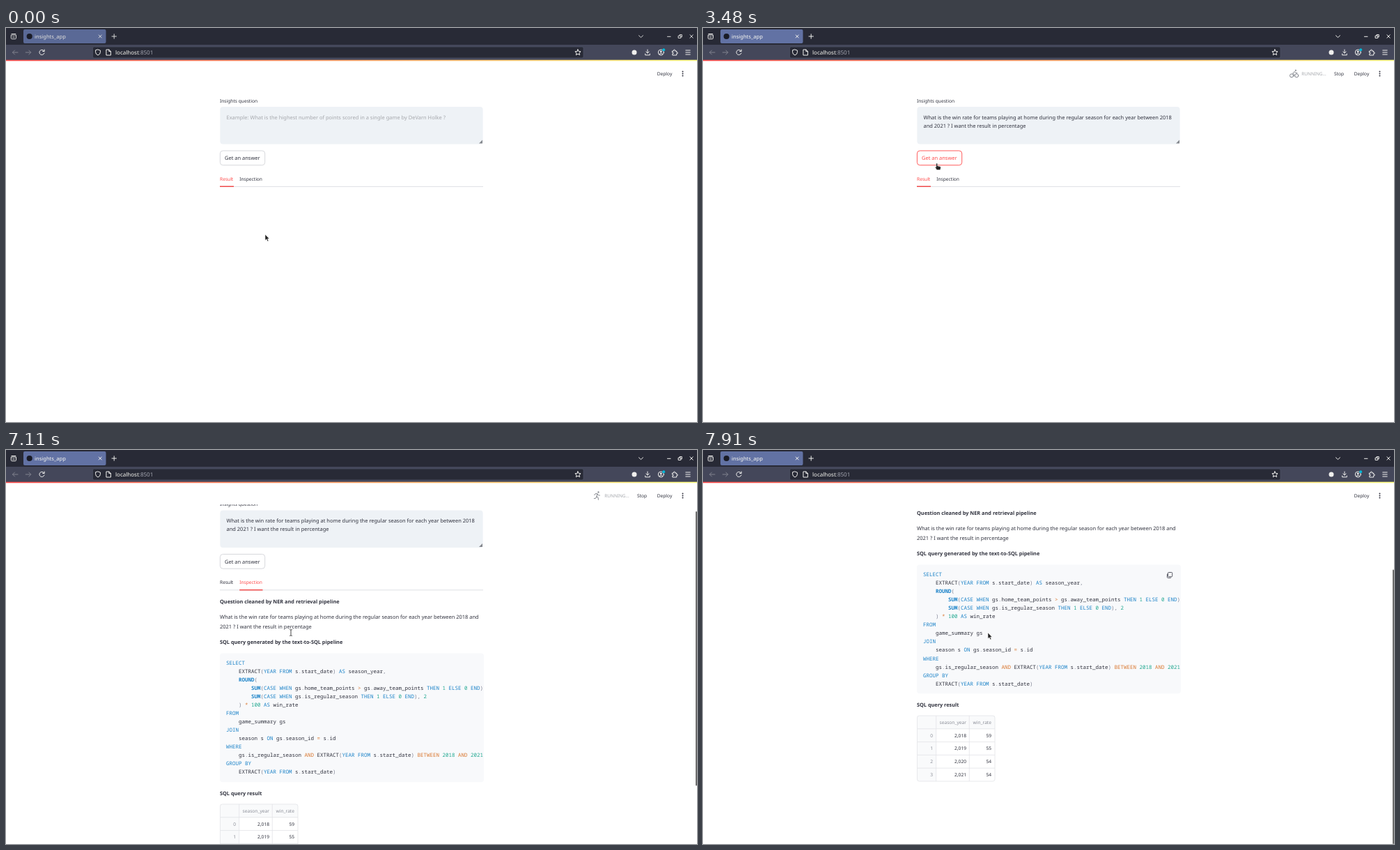
These frames come from a looping animation (992 px wide and 565 px high, 8000 ms). An HTML page:

```html
<!DOCTYPE html>
<html lang="en">
<head>
<meta charset="utf-8">
<title>insights_app</title>
<style>
html, body { margin: 0; width: 100%; height: 100%; overflow: hidden; background: #fff; }
svg { display: block; width: 992px; height: 565px; }
text { font: 7.47px "Noto Sans", sans-serif; fill: #31333f; text-rendering: geometricPrecision; }
.small { font-size: 6.65px; }
.bold { font-size: 7.33px; font-weight: 700; }
.code { font: 7.5px "Noto Sans Mono", monospace; }
.kw { fill: #1c83c8; } .fn { fill: #1c83c8; font-weight: 700; }
.op { fill: #d9772f; } .num { fill: #21a890; } .punct { fill: #808495; }
.muted { fill: #8c8f99; } .pale { fill: #a6a8ad; }
.end { text-anchor: end; }
.icon { fill: none; stroke: #f0f0ee; stroke-width: 1; stroke-linecap: round; stroke-linejoin: round; }
.dim { stroke: #81838f; }
.sport { fill: none; stroke: #777a82; stroke-width: .9; stroke-linecap: round; stroke-linejoin: round; }
.cursor { fill: #222; stroke: #fff; stroke-width: .5; }
</style>
</head>
<body>
<svg viewBox="0 0 992 565">
  <defs>
    <clipPath id="pageClip"><rect y="78" width="992" height="487"/></clipPath>
    <clipPath id="codeClip"><rect x="307" y="318" width="378.5" height="185"/></clipPath>
    <linearGradient id="stripe"><stop stop-color="#ff4b4b"/><stop offset="1" stop-color="#fffd80"/></linearGradient>
  </defs>

  <!-- Browser chrome -->
  <rect width="992" height="24" fill="#282a36"/>
  <g id="tabStrip">
    <rect x="25" y="2" width="118.5" height="20" rx="2" fill="#6272a4"/>
    <circle cx="33.7" cy="12" r="4.1" fill="#191b26"/>
    <text x="41" y="14.8" style="font-size:7.6px;fill:#f8f8f2">insights_app</text>
    <path class="icon" d="M133.2 10l4 4m0-4l-4 4M152 12h6.4M155.2 8.8v6.4M908.5 10.8l3 2.8 3-2.8M949.5 12.3h4.5M982 9.8l4.2 4.4m0-4.4l-4.2 4.4"/>
    <path class="icon" d="M7.3 10.5v4q0 1.2 1.2 1.2h4.8q1.2 0 1.2-1.2v-4zM8 8.5h5.8M9.5 13h2.8M965.5 11.2h3.3v3.2h-3.3zM967 11V9.6h3.3v3.2H969"/>
  </g>
  <rect y="24" width="992" height="22" fill="#44475a"/>
  <rect x="124.5" y="27" width="704.5" height="16" rx="2" fill="#282a36" stroke="#505367" stroke-width=".7"/>
  <path class="icon dim" d="M17 35H9.5m3-3l-3 3 3 3M28.3 35h7.5m-3-3l3 3-3 3"/>
  <path class="icon" d="M54.6 33A3.6 3.6 0 1 0 55 36M55.1 31v2.5h-2.5M132 31l3.4 1.1v2.6q0 3-3.4 4.3-3.4-1.3-3.4-4.3v-2.6zM144.3 31h3.5l2.6 2.6V39h-6.1zM147.8 31v2.6h2.6"/>
  <path class="icon" d="M821 30.8l1.2 2.7 2.9.3-2.2 2 .7 2.9-2.6-1.5-2.6 1.5.7-2.9-2.2-2 2.9-.3z"/>
  <circle cx="902" cy="35" r="3.5" fill="#f0f0ee"/>
  <path class="icon" d="M921 31v5m-2.2-2.1l2.2 2.2 2.2-2.2M917.7 37v1.8h6.6V37M975.8 32h6.4m-6.4 3h6.4m-6.4 3h6.4M956.8 33h1.8q-.6-2 .9-2t.9 2h2.3v2q1.7-.5 1.7.8t-1.7.9V39h-5.9v-2.1q1.5.2 1.5-.9t-1.5-.9z"/>
  <circle class="icon" cx="940.3" cy="35" r="4"/>
  <path class="icon" d="M938 37.2q2.3-1.6 4.6 0"/><circle cx="940.3" cy="34" r="1.4" fill="#f0f0ee"/>
  <circle cx="944.2" cy="31.2" r="2" fill="#00b8d9"/>
  <text x="157" y="37.8" style="font-size:8px;fill:#f8f8f2">localhost<tspan fill="#a3a5b0">:8501</tspan></text>
  <rect y="45.7" width="992" height="1.6" fill="url(#stripe)"/>

  <!-- App header -->
  <text class="small" x="934.7" y="68">Deploy</text>
  <g fill="#31333f"><circle cx="971.5" cy="62.6" r="1"/><circle cx="971.5" cy="65.6" r="1"/><circle cx="971.5" cy="68.6" r="1"/></g>
  <g id="running">
    <path id="bike" class="sport" d="M847.5 68.3a2.5 2.5 0 1 1-5 0 2.5 2.5 0 1 1 5 0M854.8 68.3a2.5 2.5 0 1 1-5 0 2.5 2.5 0 1 1 5 0M848.6 69.2l.2-2.5-2.3-1.7 2.8-2.5 1.6 2h2M850.9 60.2a.7.7 0 1 1-.1 0"/>
    <path id="runner" class="sport" d="M850.5 59.8a.8.8 0 1 1-.1 0M844.8 64.6l1.3-2 3 .3-1.3 4 2.2 1.2.4 3.2M847.8 66.9l-1 2.2-2.5.5M849.1 62.9l1.3 1.9 2 .3"/>
    <path id="swimmer" class="sport" d="M843.5 67q1.5-1.3 2.8 0t2.8 0 2.8 0 2.2 0M843.5 70.2q1.5-1.3 2.8 0t2.8 0 2.8 0 2.2 0M845 65.5l3.3-2-1.8-2.1 3-1M848.3 63.5l2.3 2M852.2 62.8a.9.9 0 1 1-.1 0"/>
    <text class="pale" x="859.3" y="68" style="font-size:6.45px">RUNNING...</text>
    <text class="small" x="906" y="68">Stop</text>
  </g>

  <!-- Scrolling page -->
  <g clip-path="url(#pageClip)">
    <g id="page">
      <text class="small" x="307" y="106.5">Insights question</text>
      <rect id="field" x="307.4" y="113" width="377.2" height="53.5" rx="4" fill="#eef2f6"/>
      <path d="M684 160.5v5h-5z" fill="#85888e"/>
      <text id="placeholder" class="pale" x="316.5" y="130.7">Example: What is the highest number of points scored in a single game by DeVarn Holke ?</text>
      <g id="question">
        <text x="316.5" y="130.7">What is the win rate for teams playing at home during the regular season for each year between 2018</text>
        <text x="316.5" y="142.7">and 2021 ? I want the result in percentage</text>
      </g>
      <rect id="button" x="307.4" y="176" width="64.3" height="20.7" rx="4" stroke-width=".9"/>
      <text id="buttonLabel" x="314" y="189.2">Get an answer</text>
      <text id="resultTab" class="small" x="307" y="218.8">Result</text>
      <text id="inspectTab" class="small" x="335.2" y="218.8">Inspection</text>
      <rect x="307" y="226.9" width="378" height="1" fill="#dfe0e5"/>
      <rect id="underline" y="226.5" height="1.5" fill="#f04a4a"/>
      <g id="inspection">
        <text class="bold" x="307" y="246.7">Question cleaned by NER and retrieval pipeline</text>
        <text x="307" y="268.8">What is the win rate for teams playing at home during the regular season for each year between 2018 and</text>
        <text x="307" y="282.8">2021 ? I want the result in percentage</text>
        <text class="bold" x="307" y="304.7">SQL query generated by the text-to-SQL pipeline</text>
        <rect x="307" y="318" width="379" height="184.7" rx="4" fill="#f8f9fb"/>
        <g id="code" clip-path="url(#codeClip)"></g>
        <rect id="codeBar" x="307" y="500.6" width="333" height="1.4" fill="#dcdde0"/>
        <path id="copy" d="M668.5 329h4.2q1 0 1 1v4.2q0 1-1 1h-4.2q-1 0-1-1V330q0-1 1-1zM667 331.2q-.6 0-.6.8v3.9q0 1 1 1h3.7q.8 0 .8-.8" fill="none" stroke="#31333f" stroke-width=".8"/>
        <text class="bold" x="307" y="521.6">SQL query result</text>
        <g id="table"></g>
      </g>
    </g>
  </g>
  <rect id="scrollbar" x="990" width="2" height="393.5" rx="1" fill="#555"/>

  <g id="cursor">
    <path id="arrow" class="cursor" d="M0 0v8.6l2-1.8 1.5 3.2 1.4-.7-1.4-3H6z"/>
    <path id="hand" class="cursor" d="M-1 .8q1-1.7 2 0v3l3.6.8q1.2.4 1 2l-.7 3h-5l-2.3-3.8q.2-1.3 1.4-.4z"/>
    <path id="ibeam" d="M-1.8-4.5q1.8 0 1.8 1v7q0 1 1.8 1M1.8-4.5Q0-4.5 0-3.5m0 7q0 1-1.8 1" fill="none" stroke="#333" stroke-width=".9"/>
  </g>
</svg>
<script>
const LOOP = 8000, RED = '#ff4b4b', DARK = '#31333f';
const el = Object.fromEntries([...document.querySelectorAll('[id]')].map(e => [e.id, e]));
const set = (e, attrs) => { for (const name in attrs) e.setAttribute(name, attrs[name]); };
const show = (e, on) => e.style.display = on ? '' : 'none';

const sql = `SELECT
    EXTRACT(YEAR FROM s.start_date) AS season_year,
    ROUND(
        SUM(CASE WHEN gs.home_team_points > gs.away_team_points THEN 1 ELSE 0 END)
        SUM(CASE WHEN gs.is_regular_season THEN 1 ELSE 0 END), 2
    ) * 100 AS win_rate
FROM
    game_summary gs
JOIN
    season s ON gs.season_id = s.id
WHERE
    gs.is_regular_season AND EXTRACT(YEAR FROM s.start_date) BETWEEN 2018 AND 2021
GROUP BY
    EXTRACT(YEAR FROM s.start_date)`;

function tokenClass(token) {
  if (/ROUND|SUM/.test(token)) return 'fn';
  if (/^(AND|BETWEEN|[>*=])$/.test(token)) return 'op';
  if (/\d/.test(token)) return 'num';
  if (/[(),.]/.test(token)) return 'punct';
  return token === 'EXTRACT' ? '' : 'kw';
}
const highlight = line => line.replace(/\b[A-Z]{2,}\b|\b\d+\b|[>*=(),.]/g,
  token => `<tspan class="${tokenClass(token)}">${token.replace('>', '&gt;')}</tspan>`);

el.code.innerHTML = sql.split('\n').map((line, i) => {
  const indent = line.search(/\S/);
  return `<text class="code" x="${316 + indent * 4.5}" y="${334.8 + i * 12.02}">${highlight(line.trim())}</text>`;
}).join('');

const rowHeight = 18.8, tableTop = 534.5;
const cell = (x, row, text, style = '') =>
  `<text class="small end ${style}" x="${x}" y="${tableTop + 11.8 + row * rowHeight}">${text}</text>`;
let table = `<rect x="307.5" y="${tableTop}" width="111.5" height="94" rx="3" fill="#fff"/>
  <path d="M307.5 ${tableTop}h111.5v${rowHeight}h-111.5zM307.5 ${tableTop}h27v94h-27z" fill="#f9fafb"/>
  <rect x="307.5" y="${tableTop}" width="111.5" height="94" rx="3" fill="none" stroke="#e3e4e8" stroke-width=".8"/>
  <path d="M334.7 ${tableTop}v94M382.3 ${tableTop}v94" stroke="#e3e4e8" stroke-width=".8"/>`;
table += cell(378, 0, 'season_year', 'muted') + cell(414, 0, 'win_rate', 'muted');
[59, 55, 54, 54].forEach((rate, i) => {
  table += `<path d="M307.5 ${tableTop + (i + 1) * rowHeight}h111.5" stroke="#e3e4e8" stroke-width=".8"/>`;
  table += cell(330, i + 1, i, 'muted') + cell(378, i + 1, '2,0' + (18 + i)) + cell(414, i + 1, rate);
});
el.table.innerHTML = table;

// Linear interpolation through [time, value] pairs.
function track(t, keys) {
  const i = keys.findIndex(k => k[0] > t);
  if (i === 0) return keys[0][1];
  if (i < 0) return keys[keys.length - 1][1];
  const [t0, a] = keys[i - 1], [t1, b] = keys[i];
  return a + (b - a) * (t - t0) / (t1 - t0);
}
const between = (t, from, to) => t >= from && t < to;

function drawButton(t) {
  const pressed = between(t, 1770, 2000), hover = between(t, 1620, 5800);
  set(el.button, { fill: pressed ? RED : '#fff', stroke: hover ? RED : '#d3d4d8' });
  el.buttonLabel.style.fill = pressed ? '#fff' : hover ? RED : DARK;
}

function drawCursor(t) {
  const x = track(t, [[110, 372], [760, 350], [1450, 350], [1690, 335.7], [5620, 335.7], [5740, 361], [6200, 361], [6700, 409]]);
  const y = track(t, [[110, 296], [760, 146], [1450, 146], [1690, 194], [5620, 194], [5740, 218], [6200, 218], [6700, 262]]);
  const hand = between(t, 1620, 6280);
  const ibeam = between(t, 690, 1560) || between(t, 6400, 7760);
  set(el.cursor, { transform: `translate(${x} ${y})` });
  show(el.hand, hand);
  show(el.ibeam, ibeam);
  show(el.arrow, !hand && !ibeam);
}

function draw(t) {
  el.tabStrip.style.opacity = t < 800 ? .88 : 1;
  show(el.placeholder, t < 1450);
  show(el.question, t >= 1450);
  set(el.field, { stroke: between(t, 800, 2000) ? RED : 'none', 'stroke-width': .9 });
  drawButton(t);

  show(el.running, between(t, 2590, 7830));
  const sport = (Math.floor((t - 3452) / 188) + 30) % 3;
  [el.bike, el.runner, el.swimmer].forEach((e, i) => show(e, i === sport));

  el.resultTab.style.fill = t < 6000 ? RED : DARK;
  el.inspectTab.style.fill = t < 5740 ? DARK : RED;
  set(el.underline, {
    x: track(t, [[6080, 307], [6360, 335.2]]),
    width: track(t, [[6080, 20], [6360, 33.3]])
  });
  show(el.inspection, t >= 6000);
  el.codeBar.style.opacity = track(t, [[6060, .8], [6500, 0]]);
  show(el.copy, t >= 7760);

  const scroll = track(t, [[6950, 0], [7350, 66], [7750, 153.5]]);
  set(el.page, { transform: `translate(0 ${-scroll})` });
  set(el.scrollbar, { y: track(t, [[6950, 80], [7350, 100], [7800, 171.5]]) });
  el.scrollbar.style.opacity = track(t, [[6000, 0], [6060, .07], [6300, 0], [6950, 0], [7050, .85]]);
  drawCursor(t);
}

const start = performance.now();
function tick() {
  draw((performance.now() - start) % LOOP);
  requestAnimationFrame(tick);
}
tick();
</script>
</body>
</html>
```
